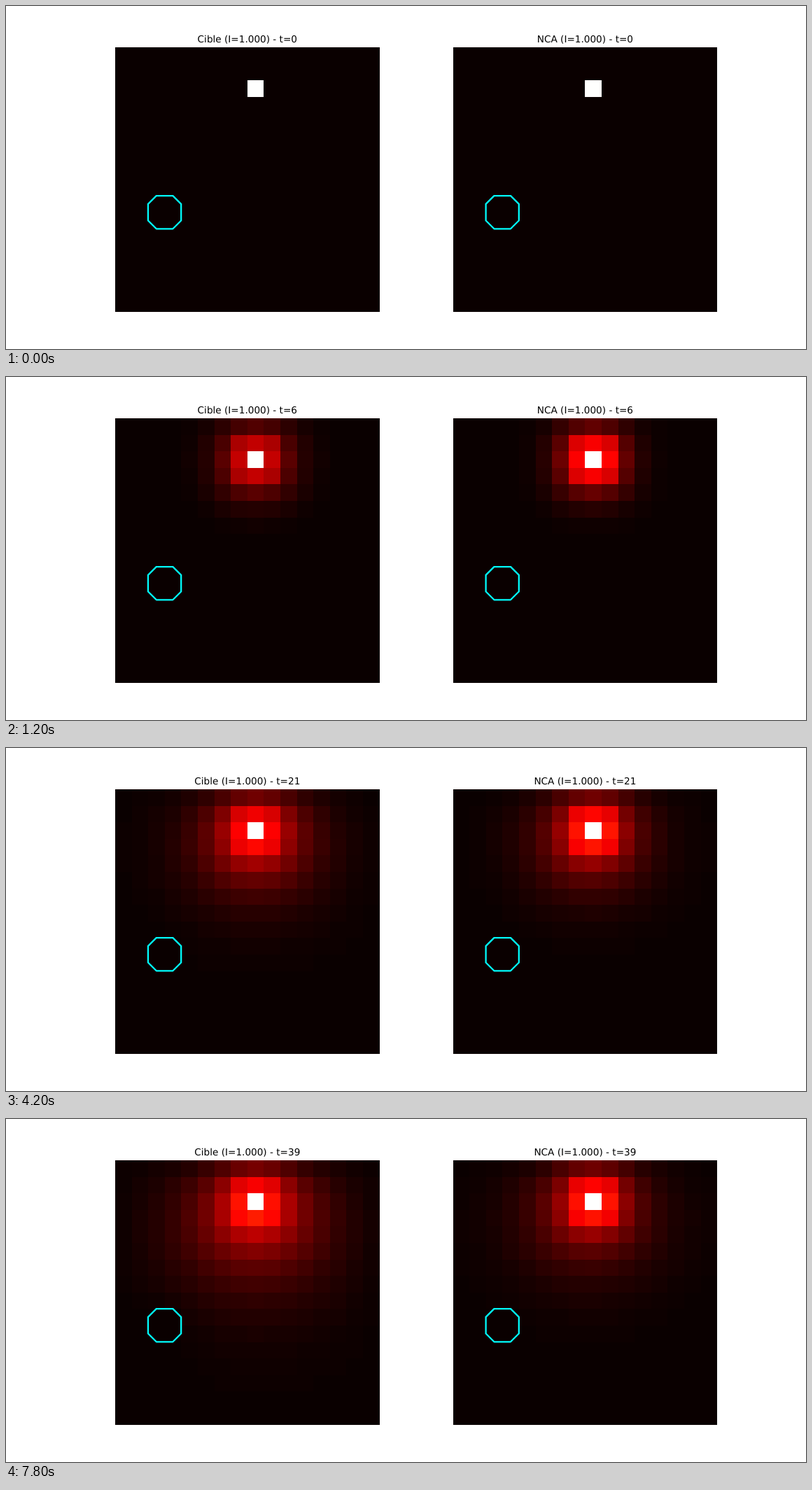
Write an HTML page with a canvas that moves like this. It is 1143 px wide and 490 px high and loops after 8 s.

```html
<!DOCTYPE html>
<html lang="fr">
<head>
<meta charset="utf-8">
<title>Diffusion</title>
<style>
  html, body { margin: 0; width: 100%; height: 100%; overflow: hidden; background: #fff; }
  canvas, svg { position: absolute; left: 0; top: 0; display: block; }
  text { font: 13.61px "DejaVu Sans", sans-serif; text-anchor: middle; text-rendering: geometricPrecision; }
  polygon { fill: none; stroke: #0ff; stroke-width: 2.27; stroke-linejoin: round; }
</style>
</head>
<body>
<canvas id="heat" width="1143" height="490"></canvas>
<svg id="marks" width="1143" height="490" viewBox="0 0 1143 490"></svg>
<script>
const N = 16, CELL = 23.6, TOP = 59, STEPS = 40, STEP_MS = 200;
const SRC = { x: 8, y: 2 };
const WALL = { x: 2, y: 9, size: 2 };

const inWall = (x, y) =>
  x >= WALL.x && x < WALL.x + WALL.size && y >= WALL.y && y < WALL.y + WALL.size;
const isSource = (x, y) => x === SRC.x && y === SRC.y;

// One step on the grid; rule(x, y, at) gives the new value of a free cell
function evolve(grid, rule, sidePad) {
  const at = (x, y) => {
    if (y < 0 || y >= N) return 0;
    if (x < 0) return sidePad * grid[y * N];
    if (x >= N) return sidePad * grid[y * N + N - 1];
    return grid[y * N + x];
  };
  return grid.map((_, i) => {
    const x = i % N, y = (i - x) / N;
    if (isSource(x, y)) return 1;
    return inWall(x, y) ? 0 : rule(x, y, at);
  });
}

function around(x, y, weigh) {
  let sum = 0;
  for (let dy = -1; dy <= 1; dy++)
    for (let dx = -1; dx <= 1; dx++)
      if (dx || dy) sum += weigh(x + dx, y + dy, dx, dy);
  return sum / 8;
}

// Plain diffusion towards the mean of the eight neighbours
const diffuse = (x, y, at) => 0.1 * at(x, y) + 0.9 * around(x, y, at);

// Learned version: slow start, stronger source, leak and a slight drift to the left
function learned(t) {
  const gain = t === 1 ? 0.5 : t === 2 ? 1.3 : 1.38 + 0.25 * Math.exp((3 - t) / 8);
  return (x, y, at) => {
    const u = at(x, y);
    const mean = around(x, y, (nx, ny, dx, dy) => {
      if (isSource(nx, ny)) return gain + (dx === -1 && dy === 0 ? 0.12 : 0);
      return at(nx, ny) * (1 + 0.04 * dx);
    });
    const next = 0.1 * u + 0.9 * mean;
    return Math.max(0, next * (0.97 - 0.13 * u) - 0.0004);
  };
}

function simulate(ruleAt, sidePad) {
  let grid = Array.from({ length: N * N }, (_, i) => +isSource(i % N, Math.floor(i / N)));
  const states = [grid];
  for (let t = 1; t < STEPS; t++) states.push(grid = evolve(grid, ruleAt(t), sidePad));
  return states;
}

function hot(value) {
  const v = Math.min(255, Math.floor(value * 256)) / 255;
  const byte = c => Math.floor(255 * Math.max(0, Math.min(1, c)));
  const r = 0.0416 + 0.9584 * v / 0.365079;
  const g = (v - 0.365079) / 0.380953;
  const b = (v - 0.746032) / 0.253968;
  return `rgb(${byte(r)},${byte(g)},${byte(b)})`;
}

const marks = document.getElementById("marks");
function addMark(tag, attrs) {
  const el = document.createElementNS("http://www.w3.org/2000/svg", tag);
  for (const key in attrs) el.setAttribute(key, attrs[key]);
  return marks.appendChild(el);
}

function makePanel(name, left, states) {
  const label = addMark("text", { x: left + N * CELL / 2, y: 52 });
  const corners = [[.5, 0], [1.5, 0], [2, .5], [2, 1.5], [1.5, 2], [.5, 2], [0, 1.5], [0, .5]];
  const points = corners.map(([x, y]) =>
    [left - 0.2 + (WALL.x + x) * CELL, TOP - 0.3 + (WALL.y + y) * CELL].join());
  addMark("polygon", { points: points.join(" ") });
  return { name, left, states, label };
}

const panels = [
  makePanel("Cible", 156, simulate(() => diffuse, 0)),
  makePanel("NCA", 638.6, simulate(learned, 0.7))
];

const ctx = document.getElementById("heat").getContext("2d");
function draw(t) {
  for (const { name, left, states, label } of panels) {
    label.textContent = `${name} (I=1.000) - t=${t}`;
    states[t].forEach((v, i) => {
      const col = i % N, row = (i - col) / N;
      const x = Math.round(left + col * CELL), y = Math.round(TOP + row * CELL);
      const right = Math.round(left + (col + 1) * CELL);
      const bottom = Math.round(TOP + (row + 1) * CELL);
      ctx.fillStyle = hot(v);
      ctx.fillRect(x, y, right - x, bottom - y);
    });
  }
}

let shown = -1;
const start = performance.now();
function tick() {
  const t = Math.floor((performance.now() - start) / STEP_MS) % STEPS;
  if (t !== shown) draw(shown = t);
  requestAnimationFrame(tick);
}
tick();
</script>
</body>
</html>
```
